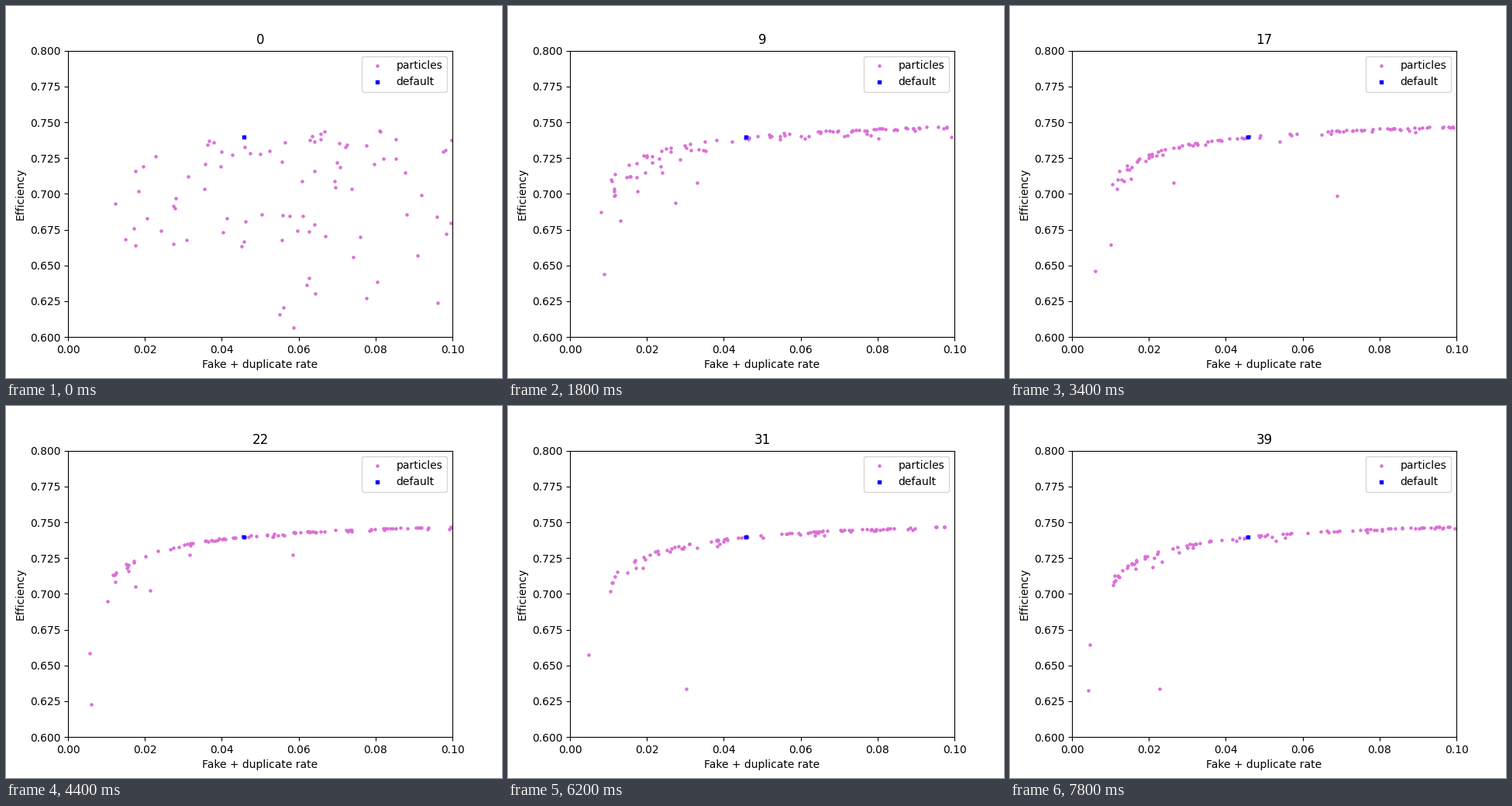
Animation, 640 px wide and 480 px high, one loop 8000 ms. Source, as a matplotlib script:

```python
import numpy as np
import matplotlib.pyplot as plt
from matplotlib.animation import FuncAnimation

GENERATIONS = 40
STEP_MS = 200
FLOOR = .605


def front(x):
    """Best efficiency reachable at a given fake rate."""
    return .7565 - .00188 * x ** -.7


def stragglers(gen, rng):
    """Scattered particles: many at first, a few on the left later."""
    count = round(4 + 84 * np.exp(-gen / 3))
    left = .004 + .007 * np.exp(-gen / 12)
    skew = 1 + min(gen / 6, 2)
    x = left + (.1 - left) * rng.random(count) ** skew
    y = FLOOR + (front(x) - FLOOR) * rng.random(count) ** .6
    return np.column_stack([x, y])


def front_cloud(gen, rng):
    """Particles that have settled just below the front."""
    count = round(95 * (1 - np.exp(-gen / 2)))
    x = .0105 + .091 * rng.random(count) ** 1.15
    scale = (.0011 + .006 * np.exp(-gen / 5)) * .03 / x
    scale *= np.where(rng.random(count) < .15, 3.5, 1)
    depth = np.minimum(rng.exponential(scale), .05)
    return np.column_stack([x, front(x) - depth])


def particles(gen):
    rng = np.random.default_rng(100 + gen)
    return np.vstack([stragglers(gen, rng), front_cloud(gen, rng)])


fig, ax = plt.subplots(figsize=(6.4, 4.8), dpi=100)
swarm = ax.scatter([], [], s=5, color="orchid", label="particles")
ax.scatter([.0458], [.7397], s=5, color="blue", marker="s", label="default")
ax.set_xlim(0, .1)
ax.set_ylim(.6, .8)
ax.set_xlabel("Fake + duplicate rate")
ax.set_ylabel("Efficiency")
ax.legend(loc="upper right")
title = ax.set_title("0")


def update(gen):
    swarm.set_offsets(particles(gen))
    title.set_text(str(gen))
    return swarm, title


anim = FuncAnimation(fig, update, frames=GENERATIONS, interval=STEP_MS,
                     init_func=lambda: update(0), repeat=True, repeat_delay=0)
plt.show()
```
